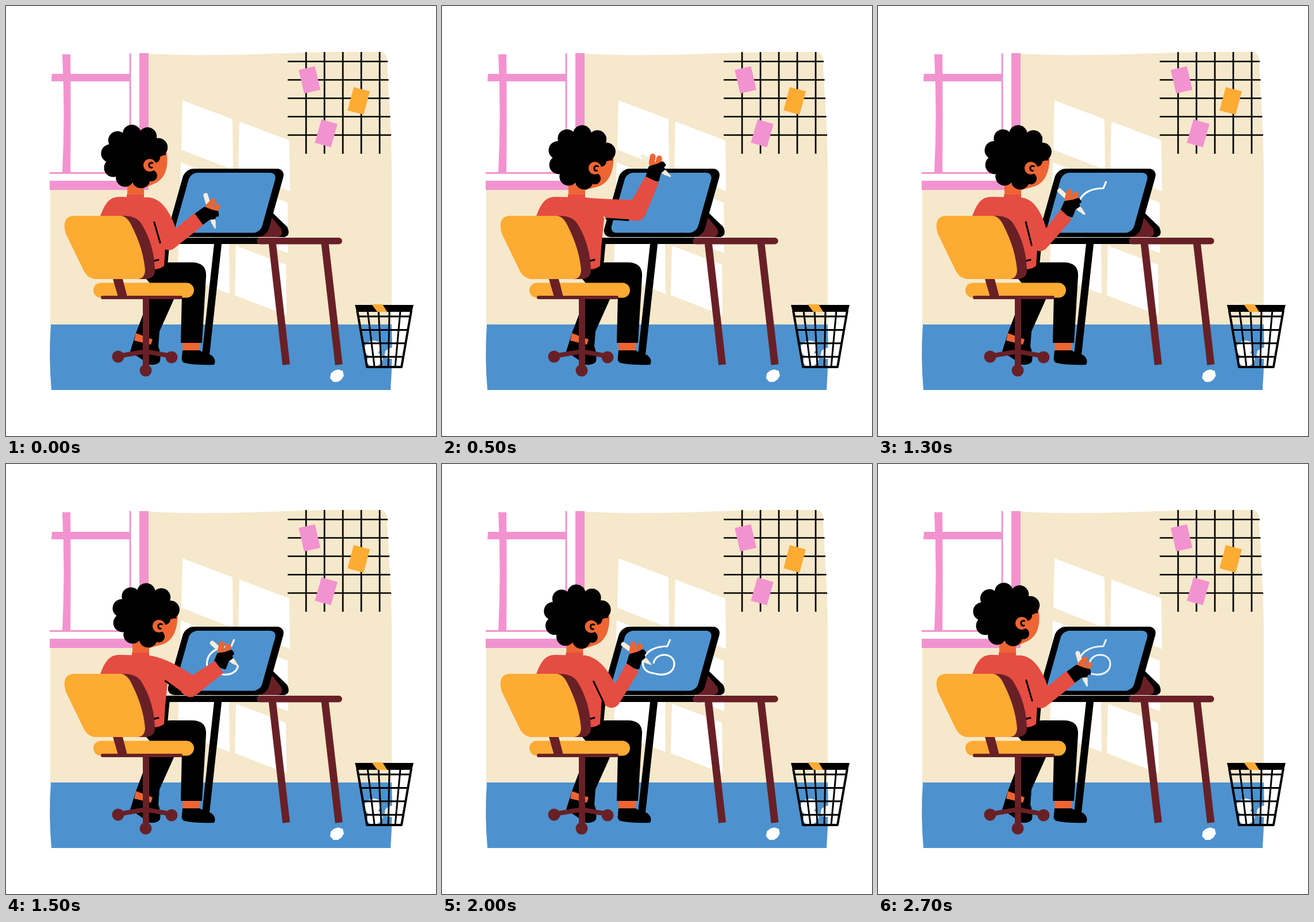
An HTML page with a canvas for the animation above (2800 ms loop, 748 by 748 pixels).

```html
<!DOCTYPE html>
<html lang="en">
<head>
<meta charset="utf-8">
<title>Drawing at a desk</title>
<style>
html, body { margin: 0; width: 100%; height: 100%; overflow: hidden; background: #fff; }
canvas { display: block; width: 748px; height: 748px; }
</style>
</head>
<body>
<canvas id="stage" width="748" height="748"></canvas>
<script>
const ctx = document.getElementById('stage').getContext('2d');
const BLACK = '#000', WHITE = '#fff', WALL = '#f5e8cb', BLUE = '#4d92ce', PINK = '#f293cf',
  AMBER = '#fdab33', MAROON = '#682026', RED = '#e54d42', SKIN = '#ee6533', PEN = '#f7ecda';
const LOOP = 2800, STEP = 100, TURN = Math.PI * 2, RIGHT = Math.PI / 2;

const fill = (color, d) => { ctx.fillStyle = color; ctx.fill(new Path2D(d)); };
const line = (color, width, d, cap = 'butt') => {
  ctx.strokeStyle = color; ctx.lineWidth = width; ctx.lineCap = cap; ctx.lineJoin = 'round';
  ctx.stroke(new Path2D(d));
};
const dot = (color, x, y, r) => {
  ctx.fillStyle = color;
  ctx.beginPath(); ctx.arc(x, y, r, 0, TURN); ctx.fill();
};
const placed = (x, y, angle, draw) => {
  ctx.save(); ctx.translate(x, y); ctx.rotate(angle); draw(); ctx.restore();
};
const mix = (a, b, u) => a + (b - a) * u;
const walk = ([x, y], angle, length) => [x + length * Math.cos(angle), y + length * Math.sin(angle)];
const aim = (a, b) => Math.atan2(b[1] - a[1], b[0] - a[0]);

const inkPath = 'M397 305L392 317C370 317 353 326 350 342C347 356 357 363 368 364' +
  'C390 371 404 361 404 348C404 337 395 332 387 332C376 332 369 339 368 347';
const ink = document.createElementNS('http://www.w3.org/2000/svg', 'path');
ink.setAttribute('d', inkPath);
const inkLength = ink.getTotalLength(), HOOK = 13, DRAW_FROM = 900, DRAW_TO = 1700;

function inkAt(t) {
  if (t < DRAW_FROM) return HOOK * Math.max(0, (t - 700) / 200);
  const u = Math.min(1, (t - DRAW_FROM) / (DRAW_TO - DRAW_FROM));
  return mix(HOOK, inkLength, u ** 1.25);
}
const inkTip = t => {
  const { x, y } = ink.getPointAtLength(inkAt(t));
  return [x, y];
};

// Each key: time, body lean, pen angle in degrees, pen tip, easing towards the next key
const smooth = u => u * u * (3 - 2 * u), speedUp = u => u * u, slowDown = u => u * (2 - u);
const restTip = [364, 387];
const keys = [
  [0, 0, 74, restTip, smooth],
  [500, 1, 36, [398, 297], smooth],
  [DRAW_FROM, 1, 48, inkTip(DRAW_FROM), slowDown],
  [DRAW_TO, 1, 41, inkTip(DRAW_TO), speedUp],
  [2000, .6, 36, [364, 349], slowDown],
  [2300, 0, 74, restTip, smooth],
  [LOOP, 0, 74, restTip, smooth]
];

function poseAt(t) {
  const i = keys.findIndex((k, n) => t < keys[n + 1][0]);
  const [start, lean, angle, tip, ease] = keys[i], [end, lean2, angle2, tip2] = keys[i + 1];
  const u = ease((t - start) / (end - start));
  return {
    lean: mix(lean, lean2, u),
    angle: mix(angle, angle2, u) * TURN / 360,
    tip: t >= DRAW_FROM && t <= DRAW_TO ? inkTip(t) : tip.map((v, n) => mix(v, tip2[n], u))
  };
}

function room() {
  fill(WALL, 'M248 83C340 88 430 84 520 81Q600 79 650 80Q662 80 663 95C664 150 671 200 671 300V556H77V320H248Z');
  fill(BLUE, 'M78 554H671Q673 610 669 668H79Q74 610 78 554Z');
  fill(PINK, 'M232 82H248V320H76V304H232ZM214.500 82H217.500V290H240V292H76V289H214.500Z' +
    'M98 84H112Q113 200 112 290H98Q103 190 98 84ZM80 118H216V131H79Z');
  for (let row = 0; row < 3; row++) {
    for (let col = 0; col < 2; col++) {
      fill(WHITE, `M${307 + 99 * col - 3 * row} ${164 + 37 * col + 108 * row}l87 33l1 88l-90 -35Z`);
    }
  }
  let grid = '';
  for (let i = 0; i < 5; i++) {
    grid += `M${522 + 32 * i} 80V257M490 ${96.5 + 32 * i}H${664 + 1.5 * i}`;
  }
  line(BLACK, 2.7, grid);
  const note = (color, x, y, degrees) =>
    placed(x, y, degrees * TURN / 360, () => fill(color, 'M-14.500 -21h29v42h-29Z'));
  note(PINK, 528, 128.5, -13);
  note(PINK, 557, 221.5, 16);
  note(AMBER, 613.5, 165, 15);
}

function paperBall(x, y, r) {
  let d = '';
  for (let i = 0; i < 9; i++) d += 'ML'[+(i > 0)] + walk([x, y], i * TURN / 9, r * (.9 + .12 * Math.sin(i * 5)));
  fill(WHITE, d + 'Z');
}

function basket() {
  paperBall(576, 643, 13);
  paperBall(638, 595, 16);
  paperBall(642, 615, 15);
  paperBall(670, 604, 12);
  let mesh = '';
  for (let i = 0; i < 4; i++) {
    const inset = i * 4;
    mesh += `M${613 + inset} ${540 + 23.4 * i}H${703 - inset}M${629 + 19 * i} 530L${641 + 12 * i} 628`;
  }
  line(BLACK, 3, mesh);
  line(BLACK, 4, 'M611 530L628 628H688L705 530');
  fill(BLACK, 'M607 520H709L706 532H610Z');
  fill(AMBER, 'M636 519H655L663 532H646Z');
}

function desk() {
  line(BLACK, 13, 'M369 410L347.500 606');
  line(BLACK, 8, 'M281 408L277 450');
  line(BLACK, 11, 'M277 408.500H440');
  fill(BLACK, 'M462 358L489 384Q496 398 485 402H440Z');
  fill(MAROON, 'M461 366L479 388Q484 401 470 402H440Z');
  line(MAROON, 13, 'M463 410L487.500 624M554.500 410L579 624');
  line(MAROON, 11.5, 'M442 408.700H579', 'round');

  const slab = (color, x, y, w, h, r) => {
    ctx.save();
    ctx.transform(1, 0, -.28, 1, x, y);
    ctx.beginPath(); ctx.roundRect(0, 0, w, h, r);
    ctx.fillStyle = color; ctx.fill();
    ctx.restore();
  };
  slab(BLACK, 311.5, 283, 175, 119, 15);
  slab(BLUE, 321, 290, 150.5, 104.5, 12);
}

function drawing(t) {
  const length = inkAt(t);
  if (!length) return;
  ctx.globalAlpha = Math.min(1, (LOOP - t) / 115);
  ctx.setLineDash([length, 999]);
  line(WHITE, 3.2, inkPath);
  ctx.setLineDash([]);
  ctx.globalAlpha = 1;
}

function legs() {
  fill(BLACK, 'M249 508H293L267 566L265 592Q270 606 268 618Q264 625 250 624L216 601L226 569Z');
  fill(SKIN, 'M226 569L255 580L252 589L223 582ZM307 585H338L336 600H307Z');
  fill(BLACK, 'M240 470Q262 446 285 446H325Q349 447 348 470L341 586H304L306 500L250 482Z' +
    'M307 599H337Q345 605 357 607Q367 615 362 624Q330 625 311 621Q304 619 306 610Z');
}

function body(lean) {
  const x = 9 * lean;
  fill(SKIN, `M${211 + x} 310h29v22h-29Z`);
  fill(RED, `M${210 + x} 328h30v12h-30Z`);
  fill(RED, 'M162 372C170 345 180 331 198 332L248 333Q276 336 282 370L277 420L275 452Q268 458 256 458H200Z');
  line(BLACK, 3, 'M255 444L265 441.500', 'round');
}

function head(lean) {
  const x = 250 + 16 * lean, y = 277 + 5 * lean + 3 * Math.sin(Math.PI * lean);
  placed(x, y, lean * TURN / 40, () => {
    // The ear is the origin
    fill(SKIN, 'M-5 -32L29 -25C33 -2 30 23 8 32L-12 41Z');
    dot(BLACK, -26, -15, 37);
    for (let i = 0; i < 8; i++) {
      const a = (77 + 37 * i) * TURN / 360;
      dot(BLACK, -25 + 44 * Math.cos(a), -15 + 40 * Math.sin(a), 16);
    }
    dot(BLACK, 9, -13, 9);
    dot(BLACK, 3, 18, 10);
    dot(SKIN, 0, 0, 11);
    line(BLACK, 3, 'M5 -4Q-2 -5 -1 1Q0 5 4 4', 'round');
    line(BLACK, 2.5, 'M18 -16Q22 -19 27 -19', 'round');
  });
}

function chair() {
  fill(MAROON, 'M200 365Q226 364 235 378C250 401 259 432 259 461Q258 474 243 475H220Z');
  fill(AMBER, 'M116 365H200Q211 366 219 383C232 409 240 434 242 460Q241 475 228 475H155Q143 474 136 462L104 396Q96 368 116 365Z');
  line(AMBER, 26, 'M165 494.500H314', 'round');
  fill(MAROON, 'M186 475H203L211 506H195Z');
  line(MAROON, 6, 'M168 507H304', 'round');
  line(MAROON, 11, 'M243.500 508V628');
  line(MAROON, 8, 'M195 609L243 601L288 609');
  line(MAROON, 21, 'M195 610h0M288 611h0M243 634h0', 'round');
}

// Drawn with the pen tip as origin and the pen along the negative x axis
function hand() {
  line(PEN, 8, 'M-60 0H-12', 'round');
  fill(PEN, 'M-12 -4L0 -1V1L-12 4Z');
  line(SKIN, 10, 'M-37 3L-41 0L-46 -10M-35 2L-31 -5L-35 -14', 'round');
  const glove = 'M-33 25L-39 8L-31 -2L-26 -11L-21 -10L-22 -6L-18 -3L-20 5L-15 18Z';
  fill(BLACK, glove);
  line(BLACK, 5, glove);
}

// Two-bone arm: the elbow follows from the shoulder and the wrist
function arm({ tip, angle }) {
  const shoulder = [278, 343], upperLength = 63, foreLength = 59;
  const wrist = walk(walk(tip, angle, -23.5), angle + RIGHT, 23);
  const reach = Math.hypot(wrist[0] - shoulder[0], wrist[1] - shoulder[1]);
  const bend = (upperLength ** 2 - foreLength ** 2 + reach ** 2) / (2 * reach * upperLength);
  const upper = aim(shoulder, wrist) + Math.acos(Math.min(1, bend));
  const elbow = walk(shoulder, upper, upperLength);
  const fore = aim(elbow, wrist);

  const outward = (upper + fore) / 2 + RIGHT;
  const inner = walk(elbow, outward, -20);
  const corner = walk(elbow, outward, 17 / Math.cos((upper - fore) / 2));
  const armpit = walk(walk(shoulder, upper, 9 + 21 * Math.sin(upper)), upper + RIGHT, 25);

  placed(...tip, angle, hand);
  ctx.beginPath();
  ctx.moveTo(248, 333);
  ctx.quadraticCurveTo(278, 336, ...inner);
  ctx.lineTo(...walk(wrist, fore - RIGHT, 13));
  ctx.lineTo(...walk(wrist, fore + RIGHT, 13));
  ctx.arcTo(...corner, ...armpit, 15);
  ctx.lineTo(...armpit);
  ctx.fillStyle = RED;
  ctx.fill();
  line(BLACK, 3, `M${armpit}L${armpit.map((v, n) => mix(v, corner[n], .6))}`, 'round');
}

function frame(now) {
  const t = Math.floor(now / STEP) * STEP % LOOP;
  const pose = poseAt(t);
  ctx.clearRect(0, 0, 748, 748);
  room();
  basket();
  desk();
  drawing(t);
  legs();
  body(pose.lean);
  head(pose.lean);
  chair();
  arm(pose);
  requestAnimationFrame(frame);
}
frame(performance.now());
</script>
</body>
</html>
```
